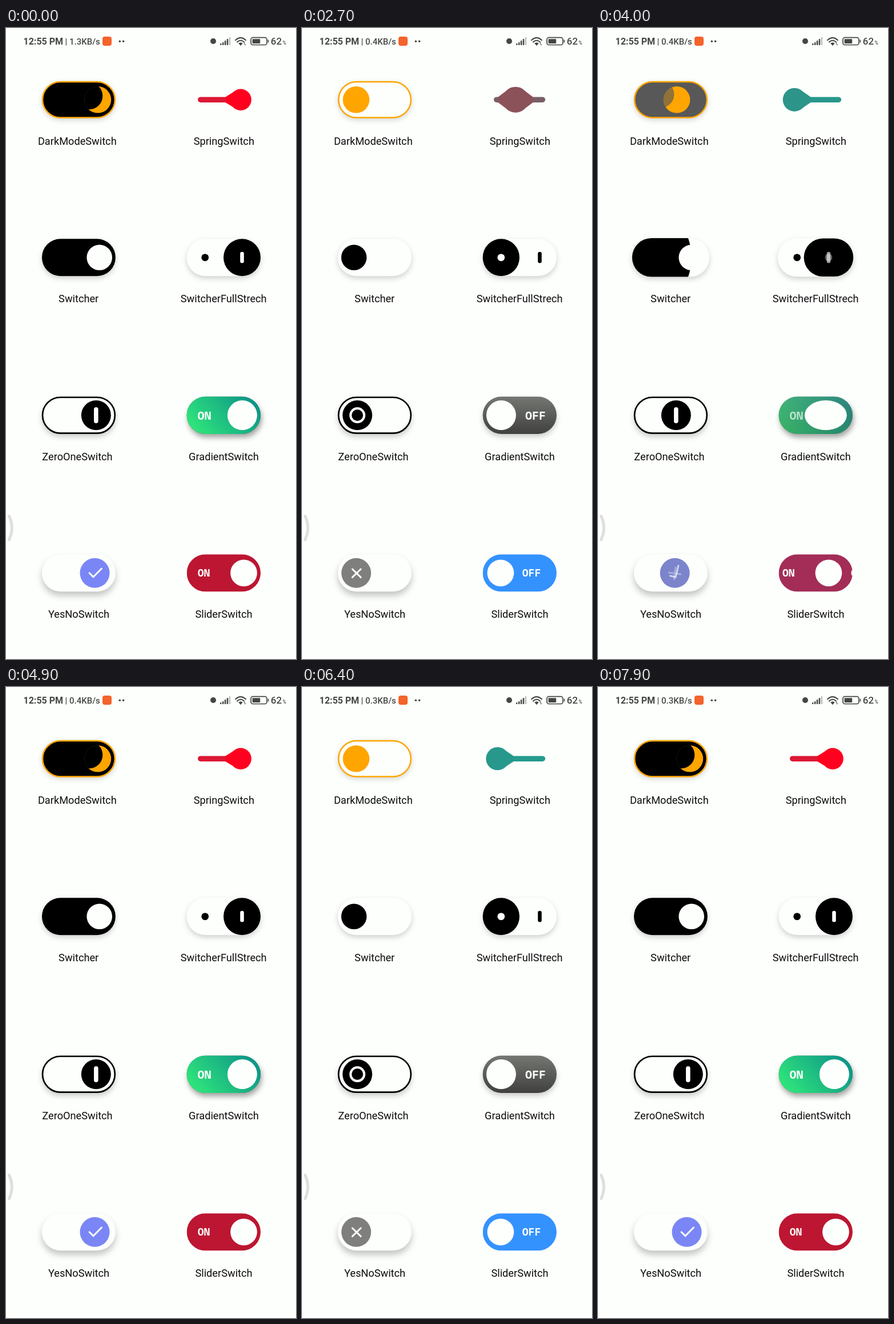
Recreate the animation shown at these times as an HTML page. Size 508 by 1102 pixels, loop 8 s.

```html
<!DOCTYPE html>
<html lang="en">
<head>
<meta charset="utf-8">
<title>Switch gallery</title>
<style>
html, body { margin: 0; width: 100%; height: 100%; overflow: hidden; background: #fdfffc; }
svg { display: block; width: 508px; height: 1102px; font-family: Roboto, sans-serif; }
.label { font-size: 18.2px; text-anchor: middle; fill: #0c0c0c; }
.mono { font-family: "Noto Sans Mono", monospace; font-weight: 600; text-anchor: middle; fill: #fdfffc; }
.status { fill: #444644; }
.paper { fill: #fdfffc; }
.line { fill: none; stroke-linecap: round; stroke-linejoin: round; }
.s1 { filter: drop-shadow(0 3px 5px rgba(0,0,0,.16)); }
.s2 { filter: drop-shadow(0 4px 5px rgba(0,0,0,.18)); }
.s3 { filter: drop-shadow(0 5px 5px rgba(0,0,0,.2)); }
.s4 { filter: drop-shadow(0 7px 6px rgba(0,0,0,.23)); }
.deep { filter: drop-shadow(2px 6px 5px rgba(0,0,0,.36)); }
</style>
</head>
<body>
<svg viewBox="0 0 508 1102">
  <defs>
    <linearGradient id="green" x1="0" y1=".7" x2="1" y2=".3">
      <stop offset="0" stop-color="#2fe67b"/><stop offset="1" stop-color="#0d9488"/>
    </linearGradient>
    <linearGradient id="grey" x1="0" y1="0" x2="0" y2="1">
      <stop offset="0" stop-color="#757773"/><stop offset="1" stop-color="#40413e"/>
    </linearGradient>
    <clipPath id="moonClip"><circle r="23.5"/></clipPath>
    <clipPath id="wipeClip"><rect id="wipeRect"/></clipPath>
    <clipPath id="pillClip"><rect x="-64.7" y="-32.6" width="129.4" height="65.2" rx="32.6"/></clipPath>
  </defs>

  <g class="status">
    <text x="30.5" y="29" font-size="16" font-weight="700">12:55 PM</text>
    <text id="speed" x="103.5" y="29" font-size="15" font-weight="500"></text>
    <rect x="169" y="15" width="16" height="16" rx="4" fill="#f4632b"/>
    <circle cx="199.3" cy="23.3" r="1.8"/><circle cx="205.6" cy="23.3" r="1.8"/>
    <circle cx="363" cy="23" r="5"/>
    <g id="signal"></g>
    <g class="line" stroke="#444644" stroke-width="2">
      <path d="M402 21.3Q411 13 420 21.3M405 24.6Q411 19 417 24.6"/>
      <rect x="429" y="16.7" width="28" height="12.8" rx="3.6" stroke-width="1.7"/>
    </g>
    <path d="M407.3 26.8Q411 23.6 414.7 26.8L411 31Z"/>
    <path d="M416.2 27.5l1.4-2 1.4 2zM417.4 28.6l1.4 2 1.4-2z"/>
    <rect x="431.6" y="19.3" width="13.6" height="7.6" rx="1"/>
    <rect x="458.6" y="20.6" width="1.7" height="5" rx=".8"/>
    <text x="463.8" y="29" font-size="17" font-weight="500">62</text>
    <text x="484.6" y="29.4" font-size="8.5" font-weight="500">%</text>
  </g>
  <path class="line" d="M5.5 852.5Q15 873 5.5 893.5" stroke="#dddfdc" stroke-width="5"/>

  <g id="labels"></g>

  <g transform="translate(127.4 125.3)">
    <rect id="darkTrack" class="s1" x="-63.4" y="-31.3" width="126.8" height="62.6" rx="31.3" stroke="#ffa500" stroke-width="2.5"/>
    <g id="moon" clip-path="url(#moonClip)">
      <circle r="23.5" fill="#ffa500"/><circle id="bite" r="23.5"/>
    </g>
  </g>

  <g transform="translate(381.3 125.2)">
    <path id="springLine" class="line" d="M-40.5 0H40" stroke-width="9.6"/>
    <g id="springKnob"><circle id="springBall"/><path id="springNeck"/></g>
  </g>

  <g transform="translate(127.4 400.8)">
    <rect id="wipeTrack" class="paper s2"/>
    <g clip-path="url(#wipeClip)"><circle id="wipe" cx="-64.4"/></g>
    <circle cx="-36.4" r="22.3"/><circle class="paper" cx="36.3" r="22.3"/>
  </g>

  <g transform="translate(381.3 400.8)">
    <rect id="fullTrack" class="paper s2"/>
    <circle cx="-32.6" r="6.4"/>
    <rect x="31.9" y="-9.8" width="6.6" height="19.6" rx="3"/>
    <rect id="fullKnob"/>
    <circle id="fullDot" class="paper" r="6.4"/>
    <rect id="fullBar" class="paper" y="-9.8" width="6.6" height="19.6" rx="3"/>
  </g>

  <g transform="translate(127.4 676.3)">
    <rect class="paper s3" x="-63.4" y="-31.3" width="126.8" height="62.6" rx="31.3" stroke="#000" stroke-width="2.7"/>
    <g id="zeroKnob">
      <circle r="26"/>
      <rect id="zero" y="-12" height="24" fill="none" stroke="#fdfffc" stroke-width="4"/>
    </g>
  </g>

  <g transform="translate(381.3 676.3)">
    <g id="gradTrack">
      <rect x="-64.7" y="-32.6" width="129.4" height="65.2" rx="32.6" fill="url(#grey)"/>
      <rect id="gradOn" x="-64.7" y="-32.6" width="129.4" height="65.2" rx="32.6" fill="url(#green)"/>
    </g>
    <text id="gradOnText" class="mono" x="-33.8" y="7.3" font-size="20">ON</text>
    <text id="gradOffText" class="mono" x="27.6" y="7.3" font-size="20">OFF</text>
    <ellipse id="gradKnob" class="paper" ry="26"/>
  </g>

  <g transform="translate(127.4 951.8)">
    <rect class="paper s4" x="-64.5" y="-32.5" width="129" height="65" rx="32.5"/>
    <g id="yesKnob">
      <circle id="yesBall" r="26"/>
      <g class="line" stroke="#fdfffc" stroke-width="3">
        <path id="cross" d="M-6.8-6.8L8 7.6M8-6.8L-6.8 7.6"/>
        <path id="check" d="M-9.5 0L-2.6 7L12-7.8"/>
      </g>
    </g>
  </g>

  <g transform="translate(381.3 951.8)" clip-path="url(#pillClip)">
    <rect id="slideTrack" x="-64.7" y="-32.6" width="129.4" height="65.2"/>
    <text id="slideOn" class="mono" y="6.6" font-size="18">ON</text>
    <text id="slideOff" class="mono" y="6.6" font-size="18">OFF</text>
    <circle id="slideKnob" class="paper" r="23.4"/>
  </g>
</svg>
<script>
const LOOP = 8000, STEP = 100;
// Times at which the state flips: off, on, off, ...
const FLIPS = [600, 1540, 1900, 3750, 5640, 6900];
const SPRING_FLIPS = [640, 1600, 2380, 3790, 5690, 6900];
const LAG = 40;

const SPEEDS = [[5900, "0.3"], [2300, "0.4"], [0, "1.3"]];
const SWELL = [[0, 0], [.15, 5], [.3, 2], [.62, 3], [.8, 9], [1, 0]];
const PAPER = [253, 255, 252], TEAL = [14, 170, 153];

const $ = id => document.getElementById(id);
const set = (id, attrs) => {
  const el = $(id);
  for (const k in attrs) el.setAttribute(k, attrs[k]);
};
const clamp = x => Math.min(1, Math.max(0, x));
const mix = (a, b, p) => a + (b - a) * p;
const rgb = (a, b, p) => `rgb(${a.map((v, i) => Math.round(mix(v, b[i], p)))})`;
const sine = p => (1 - Math.cos(Math.PI * p)) / 2;
const smooth = x => { x = clamp(x); return x * x * (3 - 2 * x); };
const shift = x => `translate(${x} 0)`;
const pill = (l, r, h) => ({ x: l, y: -h, width: r - l, height: 2 * h, rx: h });

function travel(t, flips, ms) {
  let p = 1;
  flips.forEach((at, i) => {
    if (t <= at) return;
    const end = Math.min(t, flips[i + 1] ?? Infinity);
    p = clamp(p + (i % 2 ? 1 : -1) * (end - at) / ms);
  });
  return p;
}

function along(table, x) {
  const i = Math.max(1, table.findIndex(([at]) => at >= x));
  const [x0, y0] = table[i - 1], [x1, y1] = table[i];
  return mix(y0, y1, (x - x0) / (x1 - x0));
}

function dark(p) {
  const tone = rgb(PAPER, [0, 0, 0], p);
  set("darkTrack", { fill: tone });
  set("moon", { transform: shift(mix(-32.6, 33.4, p)) });
  set("bite", { cx: -15 - 38 * (1 - p), cy: -6.6 - 8 * (1 - p), fill: tone, opacity: p });
}

function spring(p) {
  const x = mix(-47, 29.8, p), r = 18.7 + 15.5 * p * (1 - p);
  const neck = (side, room) => {
    const tip = side * (r - 6 + 14 * clamp((room - r) / 10)), edge = side * r * .72;
    return `M${edge} ${-r * .69}L${tip} -4.8V4.8L${edge} ${r * .69}Z`;
  };
  set("springLine", { stroke: rgb(TEAL, [220, 24, 52], p) });
  set("springKnob", { transform: shift(x), fill: rgb(TEAL, [255, 0, 30], p) });
  set("springBall", { r });
  set("springNeck", { d: neck(-1, x + 45) + neck(1, 45 - x) });
}

function switcher(p) {
  const grow = along(SWELL, p);
  const box = pill(-64.5 - grow, 64.5 + grow, 32.5 + grow * .4);
  set("wipeTrack", box);
  set("wipeRect", box);
  set("wipe", { r: 140 * p ** .7 });
}

function fullStretch(p) {
  const grow = 2 * Math.sin(Math.PI * p);
  const l = mix(-64.7, -.3, smooth((p - .15) / .75)) - grow * .4;
  const r = mix(-.3, 64.7, smooth(p * 1.6)) + grow * .7;
  const mid = (l + r) / 2;
  set("fullTrack", pill(-64.7 - grow, 64.7 + grow, 32.5 + grow * .5));
  set("fullKnob", pill(l, r, 32.5 + grow * .4));
  set("fullDot", { cx: mid, opacity: 1 - p });
  set("fullBar", { x: mid - 3.3, opacity: p });
}

function zeroOne(p) {
  const w = mix(24, 3.6, clamp(p * 1.55));
  set("zeroKnob", { transform: shift(mix(-30.4, 30.4, p)) });
  set("zero", { x: -w / 2, width: w, rx: w / 2 });
}

function gradient(p) {
  const l = mix(-58.4, 6.6, p ** 1.2), r = mix(-6.4, 58.6, 1 - (1 - p) ** 2.6);
  set("gradTrack", { class: p > .5 ? "deep" : "s3" });
  set("gradOn", { opacity: p });
  set("gradOnText", { opacity: p });
  set("gradOffText", { opacity: 1 - p });
  set("gradKnob", { cx: (l + r) / 2, rx: (r - l) / 2 });
}

function yesNo(p) {
  set("yesKnob", { transform: shift(mix(-32.4, 28.1, p)) });
  set("yesBall", { fill: rgb([127, 128, 126], [122, 134, 245], p) });
  set("cross", { transform: `rotate(${80 * p})`, opacity: 1 - p });
  set("check", { transform: `rotate(${-90 * (1 - p)})`, opacity: p });
}

function slider(p) {
  const q = 1 - (1 - p) ** 1.6;
  set("slideTrack", { fill: rgb([52, 146, 255], [188, 22, 50], q) });
  set("slideOn", { x: -34.8 - 70 * (1 - q) });
  set("slideOff", { x: 20.7 + 70 * q });
  set("slideKnob", { cx: mix(-33.4, 35.2, q) });
}

function draw(now) {
  const t = Math.floor((now % LOOP) / STEP) * STEP;
  const bouncy = travel(t, FLIPS, 400);
  const p = sine(travel(t - LAG, FLIPS, 350));
  switcher(bouncy);
  fullStretch(bouncy);
  spring(sine(travel(t, SPRING_FLIPS, 900)));
  [dark, zeroOne, gradient, yesNo, slider].forEach(f => f(p));
  $("speed").textContent = `| ${SPEEDS.find(([at]) => t >= at)[1]}KB/s`;
}

const NAMES = [
  ["DarkModeSwitch", 124.8], ["SpringSwitch", 381.8],
  ["Switcher", 127.2], ["SwitcherFullStrech", 381.2],
  ["ZeroOneSwitch", 125], ["GradientSwitch", 381.5],
  ["YesNoSwitch", 127.5], ["SliderSwitch", 381.5]
];
$("labels").innerHTML = NAMES.map(([name, x], i) =>
  `<text class="label" x="${x}" y="${203.6 + 275.5 * (i >> 1)}">${name}</text>`).join("");
$("signal").innerHTML = [3, 5, 8, 11, 14].map((h, i) =>
  `<rect x="${375 + 3.9 * i}" y="${30 - h}" width="2.5" height="${h}" rx="1" opacity="${i > 3 ? .35 : 1}"/>`).join("");

const start = performance.now();
function tick() {
  draw(performance.now() - start);
  requestAnimationFrame(tick);
}
tick();
</script>
</body>
</html>
```
